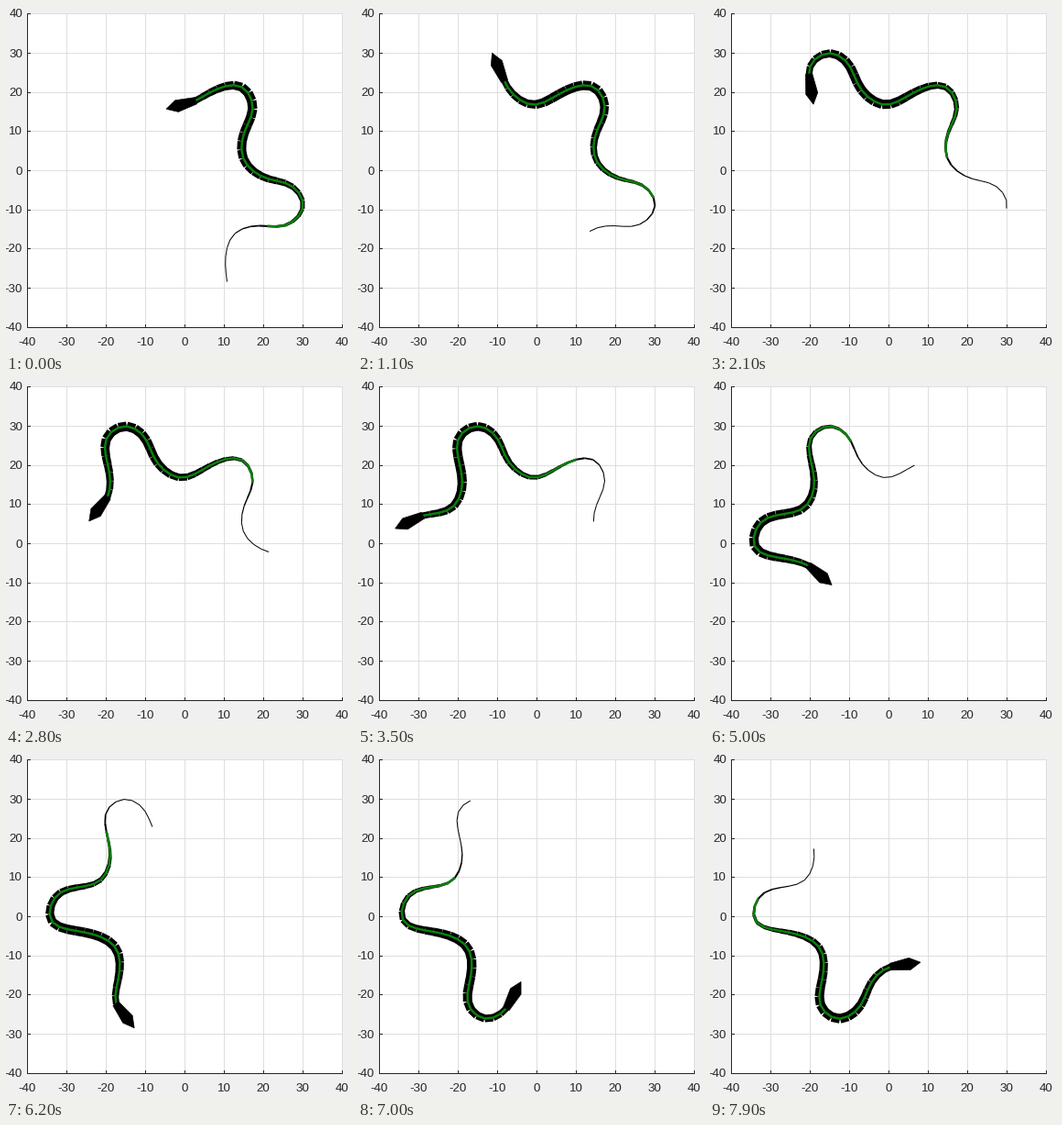
A matplotlib script for the animation above (8000 ms loop, 378x376 px).

```python
import numpy as np
import matplotlib.pyplot as plt
from matplotlib.animation import FuncAnimation
from matplotlib.collections import LineCollection

W, H, DPI = 378, 376, 64
PX = 72 / DPI                    # one pixel in points
FRAMES, INTERVAL = 80, 100
LEFT, RIGHT, TOP, BOTTOM = 23, 367, 8, 350
INK, GRID, GREEN = "#262626", "#dedede", "#0a800a"
BODY, SEGMENTS, GREEN_FROM, LOOKAHEAD = 371.5, 40, 10, 15

# Key points of the winding track, in pixels
TRACK = [
    (241, 300), (239.5, 272), (248.5, 248.5), (276, 239), (306, 238),
    (324, 217), (312, 196), (285, 187.5), (259, 166), (260, 137), (269, 109),
    (259, 89), (222, 94), (190, 107), (163, 88), (150, 62), (130, 51),
    (110, 63), (110, 90), (113, 118), (103, 139), (78, 147), (54, 157),
    (48, 181), (85, 196), (120.5, 215), (122.5, 245), (121, 277), (138, 290),
    (163, 277), (175, 252), (192, 235.5), (221, 231)]

# (seconds, pixels travelled) where the speed changes
PACE = [(0, 0), (0.9, 43), (2.7, 188), (4.5, 311), (5.4, 384.5), (6.2, 430),
        (7.9, 542)]


def smooth_track(points, samples=2000):
    """Natural cubic spline through points, as a function of arc length."""
    p = np.array(points, float)
    h = np.hypot(*np.diff(p, axis=0).T)
    knots = np.r_[0, np.cumsum(h)]
    slope = np.diff(p, axis=0) / h[:, None]
    n = len(p)
    a, b = np.eye(n), np.zeros((n, 2))
    for i in range(1, n - 1):
        a[i, i - 1:i + 2] = h[i - 1], 2 * (h[i - 1] + h[i]), h[i]
        b[i] = 6 * (slope[i] - slope[i - 1])
    m = np.linalg.solve(a, b)

    t = np.linspace(0, knots[-1], samples)
    i = np.clip(np.searchsorted(knots, t) - 1, 0, n - 2)
    d, e, w = (v[:, None] for v in (t - knots[i], knots[i + 1] - t, h[i]))
    xy = ((m[i] * e**3 + m[i + 1] * d**3) / (6 * w)
          + (p[i] / w - m[i] * w / 6) * e
          + (p[i + 1] / w - m[i + 1] * w / 6) * d)
    arc = np.r_[0, np.cumsum(np.hypot(*np.diff(xy, axis=0).T))]
    return lambda s: np.column_stack([np.interp(s, arc, c) for c in xy.T])


def body_width(u):
    """Thin tail swelling into the trunk, narrowing again at the neck."""
    t = np.clip((u - 40) / 230, 0, 1)
    return np.minimum(1 + 9.3 * t * t * (3 - 2 * t), 7 + (BODY - u) / 20)


track = smooth_track(TRACK)
nodes = np.linspace(0, BODY, SEGMENTS + 1)
widths = body_width((nodes[:-1] + nodes[1:]) / 2)

# Head outline: distance ahead of the neck, offset to the side
HEAD = np.array([(-1, 3.8), (20.5, 6.6), (32.5, 0), (20.5, -6.6), (-1, -3.8)])

fig = plt.figure(figsize=(W / DPI, H / DPI), dpi=DPI, facecolor="#f0f0f0")
ax = fig.add_axes([0, 0, 1, 1])
ax.set_xlim(-0.5, W - 0.5)       # whole numbers are pixel centres
ax.set_ylim(H - 0.5, -0.5)
ax.axis("off")


def line(x, y, color, z):
    ax.plot(x, y, color=color, lw=PX, zorder=z, snap=False,
            solid_capstyle="projecting")


def draw_axes():
    ax.fill([LEFT, RIGHT, RIGHT, LEFT], [TOP, TOP, BOTTOM, BOTTOM],
            color="white", lw=0, zorder=0)
    font = dict(family="Liberation Sans", size=13.33 * PX, color=INK, va="baseline")
    for k in range(9):
        value = str(10 * k - 40)
        x = round(LEFT + (RIGHT - LEFT) * k / 8)
        y = round(BOTTOM + (TOP - BOTTOM) * k / 8)
        line([x, x], [TOP, BOTTOM], GRID, 1)
        line([LEFT, RIGHT], [y, y], GRID, 1)
        line([x, x], [BOTTOM - 3, BOTTOM], INK, 2)
        line([LEFT, LEFT + 3], [y, y], INK, 2)
        ax.text(x - 0.5, 369, value, ha="center", **font)
        ax.text(17.5, y + 4, value, ha="right", **font)
    line([LEFT, LEFT], [TOP, BOTTOM], INK, 2)
    line([LEFT, RIGHT], [BOTTOM, BOTTOM], INK, 2)


draw_axes()
body = LineCollection([], colors="black", linewidths=widths * PX,
                      capstyle="butt", zorder=3)
ax.add_collection(body, autolim=False)
stripe, = ax.plot([], [], color=GREEN, lw=2.5 * PX, zorder=4,
                  solid_capstyle="butt", solid_joinstyle="round")
head, = ax.fill([0, 0, 0], [0, 0, 0], color="black", lw=0.6 * PX, zorder=5)


def update(frame):
    tail = np.interp(frame * INTERVAL / 1000, *zip(*PACE))
    spine = track(tail + nodes)
    body.set_segments(np.stack([spine[:-1], spine[1:]], axis=1))
    stripe.set_data(*spine[GREEN_FROM:].T)

    neck = spine[-1]
    ahead = track([tail + BODY + LOOKAHEAD])[0] - neck
    ahead /= np.hypot(*ahead)
    side = np.array([-ahead[1], ahead[0]])
    head.set_xy(neck + HEAD[:, :1] * ahead + HEAD[:, 1:] * side)
    return body, stripe, head


anim = FuncAnimation(fig, update, frames=FRAMES, interval=INTERVAL,
                     repeat=True, repeat_delay=0)
plt.show()
```
